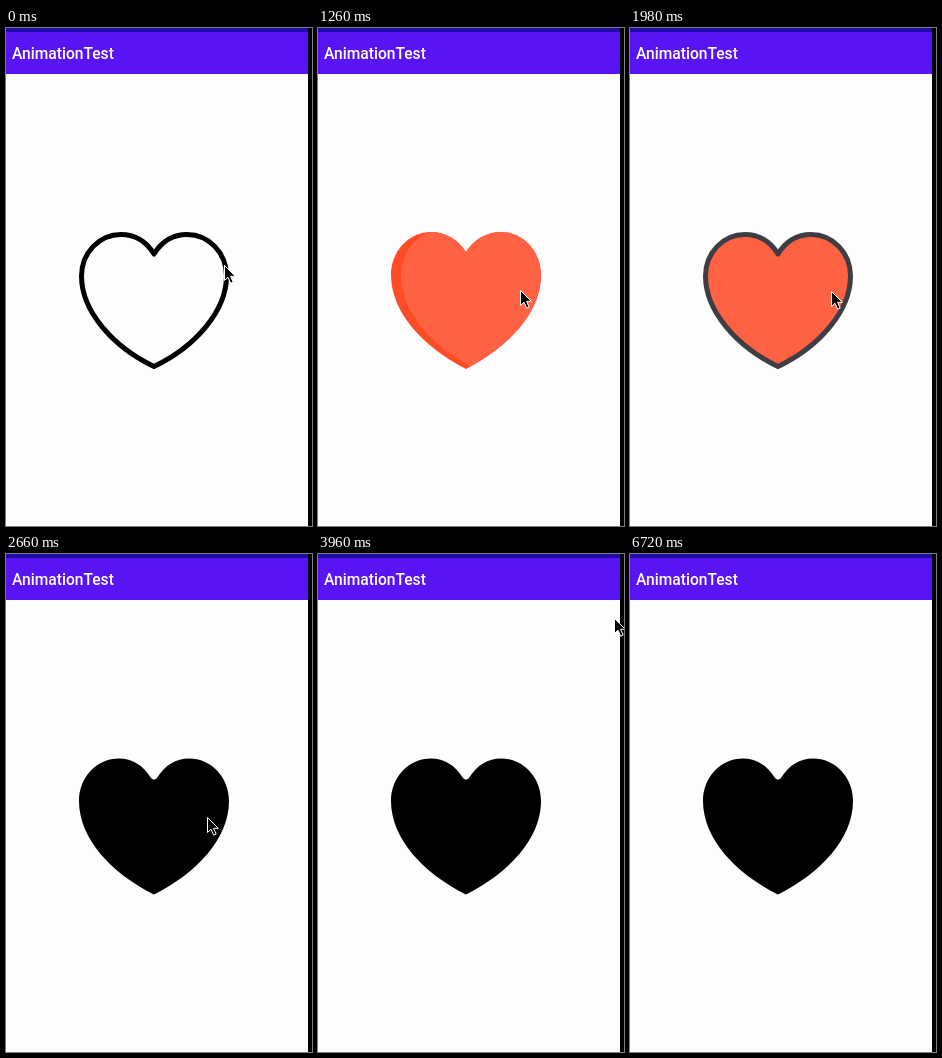
Animation of 306 by 498 pixels, one loop 6960 ms. Source, as an HTML page:

```html
<!DOCTYPE html>
<html lang="en">
<head>
<meta charset="utf-8">
<title>AnimationTest</title>
<style>
  html, body { margin: 0; width: 100%; height: 100%; overflow: hidden; background: #fdfdfd; }
  svg { display: block; width: 306px; height: 498px; }
  text { font: 500 15.6px Roboto, sans-serif; fill: #fff; }
  .line { stroke-width: 5; stroke-linejoin: round; }
</style>
</head>
<body>
<svg viewBox="0 0 306 498">
  <defs>
    <path id="contour" d="M148 226C140 213 128 206.5 115 206.5C93 206.5 75.5 225 75.5 248C75.5 283 106.5 318.5 148 338.5C189.5 318.5 220.5 283 220.5 248C220.5 225 203 206.5 181 206.5C168 206.5 156 213 148 226Z"/>
    <path id="solid" d="M148 224C140 211 127 204 113 204C91 204 73 223 73 247C73 285 106 319.5 148 341C190 319.5 223 285 223 247C223 223 205 204 183 204C169 204 156 211 148 224Z"/>
    <clipPath id="inside"><use href="#solid"/></clipPath>
  </defs>

  <rect width="306" height="498" fill="#fdfdfd"/>
  <rect width="302" height="46" fill="#5814f2"/>
  <rect width="302" height="4" fill="#200da8"/>
  <rect x="302" width="4" height="498"/>
  <text x="6" y="31.3">AnimationTest</text>

  <g class="heart"><use href="#contour" class="line" fill="none" stroke="#000"/></g>
  <g class="heart">
    <use href="#solid" fill="#ff4b26"/>
    <path clip-path="url(#inside)" fill="#ff6243" d="M120 200C98 207 83 224 83 247C83 284 114 318 153 338.5L230 345V200Z"/>
  </g>
  <g class="heart"><use href="#contour" class="line" fill="#ff6243" stroke="#3e3d43"/></g>
  <g class="heart">
    <path d="M145 224C137 211 126 204.5 113 204.5C91 204.5 73 223 73 247C73 285 106 319.5 148 340.5C190 319.5 223 285 223 247C223 223 205 204.5 183 204.5C170 204.5 159 211 151 224Q148 227.5 145 224Z"/>
  </g>

  <path id="cursor" d="M.5 .5V15.5L4 12.2L6.7 18.2L9.2 17.1L6.6 11.3H11.3Z" stroke="#fff"/>
</svg>
<script>
const LOOP = 6960;
const hearts = [...document.querySelectorAll('.heart')];
const cursor = document.getElementById('cursor');

// Start time of each heart drawable, in ms
const heartStarts = [0, 1260, 1960, 2660];

// Pointer stops: [tick, x, y]
const stops = [
  [0, 218, 237], [6, 202, 262], [39, 202, 262], [40, 201, 263],
  [75, 201, 263], [80, 235, 198], [86, 296, 64], [89, 312, 36]
];

// Screen updates come at 0, 20 and 40 ms of every 140 ms
function tickAt(ms) {
  const rest = ms % 140;
  return Math.floor(ms / 140) * 3 + (rest < 20 ? 0 : rest < 40 ? 1 : 2);
}

function pointerAt(tick) {
  const i = stops.findIndex(stop => stop[0] > tick);
  if (i < 0) return stops.at(-1).slice(1);
  const [t0, x0, y0] = stops[i - 1], [t1, x1, y1] = stops[i];
  const k = (tick - t0) / (t1 - t0);
  return [x0 + (x1 - x0) * k, y0 + (y1 - y0) * k].map(Math.round);
}

function draw(ms) {
  const active = heartStarts.findLastIndex(start => ms >= start);
  hearts.forEach((heart, i) => heart.setAttribute('display', i === active ? 'inline' : 'none'));
  cursor.setAttribute('transform', `translate(${pointerAt(tickAt(ms))})`);
}

const begin = performance.now();
function loop() {
  draw((performance.now() - begin) % LOOP);
  requestAnimationFrame(loop);
}
draw(0);
requestAnimationFrame(loop);
</script>
</body>
</html>
```
